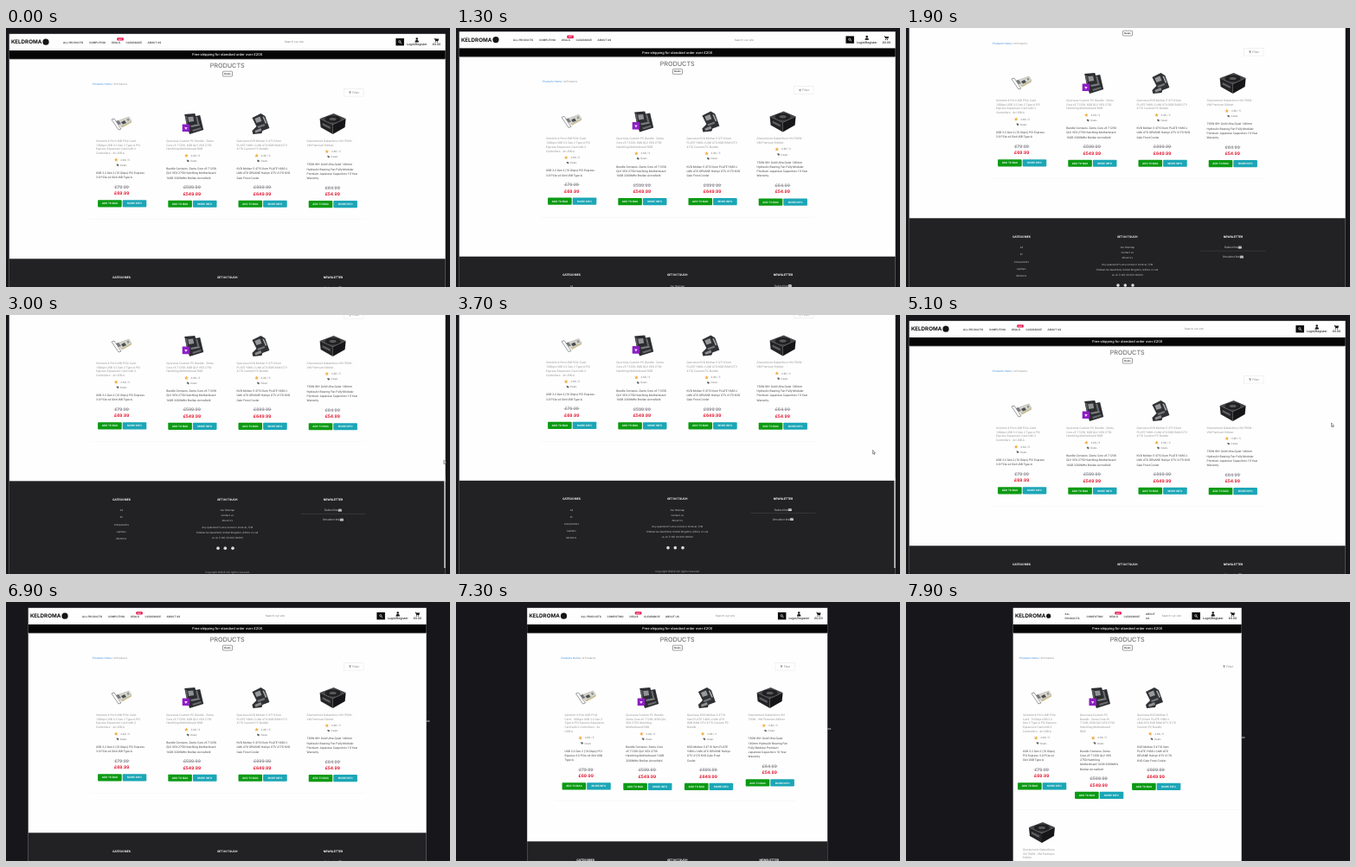
These frames come from a looping animation (513x300 px, 8000 ms). An HTML page:

```html
<!DOCTYPE html>
<html lang="en">
<head>
<meta charset="utf-8">
<title>Shop page</title>
<style>
html, body { margin: 0; width: 100%; height: 100%; overflow: hidden; background: #17171b; }
svg { display: block; width: 100vw; height: 100vh; text-rendering: geometricPrecision; }
text { font-family: Inter, Roboto, sans-serif; white-space: pre; }
.copy text { font-family: Roboto, "Open Sans", sans-serif; }
</style>
</head>
<body>
<svg id="stage" viewBox="0 0 513 300"></svg>
<script>
const stage = document.getElementById('stage');
const LOOP = 8000, STEP = 100, MID = 255.7;

const products = [
  { title: 'Velotrim 4-Port USB PCIe Card - 10Gbps USB 3.2 Gen 2 Type-A PCI Express Expansion Card with 2 Controllers - 4x USB-A',
    info: 'USB 3.2 Gen 2 (10 Gbps) PCI Express 3.0 PCIe x4 Slot USB Type-A',
    was: '£79.99', now: '£69.99', art: expansionCard },
  { title: 'Quorvexa Custom PC Bundle - Zentu Core z5 7125K, 8GB QLV VEX 2750 Hatchling Motherboard RGB',
    info: 'Bundle Contains: Zentu Core z5 7125K QLV VEX 2750 Hatchling Motherboard 16GB 3200MHz Brellan Arrowfield',
    was: '£599.99', now: '£549.99', art: purpleBoard },
  { title: 'Quorvexa KVD Moltan 5 4710 Ilum PLATE Y480-J LM6 ATX 8GB RAM GTV 4170 Custom PC Bundle',
    info: 'KVD Moltan 5 4710 Ilum PLATE Y480-J LM6 ATX ORVANE Halcyn GTV 4170 KVD Gale Frost Cooler',
    was: '£699.99', now: '£649.99', art: darkBoard },
  { title: 'Glaciermont Oakenforce VN 750W - VM Premium Edition',
    info: '750W 80+ Gold Ultra Quiet 140mm Hydraulic Bearing Fan Fully Modular Premium Japanese Capacitors 10 Year Warranty',
    was: '£64.99', now: '£54.99', art: powerSupply }
];

// Responsive layouts, widest first
const layouts = [
  { min: 367.5, x: 134, gap: 81.2, inset: 30, cols: 4, titleLen: 33, infoLen: 36,
    crumb: 100, filter: 396, line: [97, 415, 221.5], footer: 267.3, footGap: 122.3 },
  { min: 315, x: 150.5, gap: 70.7, inset: 25, cols: 4, titleLen: 28, infoLen: 28,
    crumb: 121.5, filter: 374.5, line: [114, 393, 230.5], footer: 277.3, footGap: 106 },
  { min: 0, x: 157, gap: 66, inset: 22, cols: 3, titleLen: 24, infoLen: 25,
    crumb: 131, filter: 366, line: [127, 386, 240], footer: 420, footGap: 84 }
];

// Time keys: [ms, value]
const scrollKeys = [[1200, 0], [1900, 47], [2300, 47], [3200, 79], [3600, 79], [4100, 45], [4300, 45], [5100, 0]];
const halfKeys = [[6700, 252], [6900, 230], [7300, 173.5], [7600, 159], [7900, 132]];
const pointerX = [[2900, 514], [3300, 481.5], [3700, 481.5], [5100, 491.5], [5300, 491.5], [5500, 504]];
const pointerY = [[2900, 172], [3300, 156.5], [3700, 156.5], [5100, 125]];
const gripY = [[6000, 135.5], [6900, 138], [7300, 147], [7900, 157]];

const linear = p => p;
const smooth = p => p * p * (3 - 2 * p);

function track(keys, t, ease = linear) {
  if (t <= keys[0][0]) return keys[0][1];
  for (let i = 1; i < keys.length; i++) {
    const [t0, a] = keys[i - 1], [t1, b] = keys[i];
    if (t <= t1) return a + (b - a) * ease((t - t0) / (t1 - t0));
  }
  return keys[keys.length - 1][1];
}

function wrap(text, max) {
  const lines = [''];
  for (const word of text.split(' ')) {
    const last = lines[lines.length - 1];
    const next = last ? last + ' ' + word : word;
    if (next.length <= max) lines[lines.length - 1] = next;
    else lines.push(word);
  }
  return lines;
}

// Drawing helpers; text y is the middle of the capitals
const text = (x, y, s, size, fill = '#222', weight = 400, anchor = 'start') =>
  `<text x="${x}" y="${y + size * 0.36}" font-size="${size}" fill="${fill}" font-weight="${weight}" text-anchor="${anchor}">${s}</text>`;
const mid = (x, y, s, size, fill, weight) => text(x, y, s, size, fill, weight, 'middle');
const rect = (x, y, w, h, fill, extra = '') => `<rect x="${x}" y="${y}" width="${w}" height="${h}" fill="${fill}" ${extra}/>`;
const dot = (x, y, r, fill) => `<circle cx="${x}" cy="${y}" r="${r}" fill="${fill}"/>`;
const path = (d, fill, extra = '') => `<path d="${d}" fill="${fill}" ${extra}/>`;
const at = (x, y, s) => `<g transform="translate(${x} ${y})">${s}</g>`;

function expansionCard() {
  return path('M-6 -2L8 -7L11 -2L-1 4Z', '#d6d4cc', 'stroke="#a5a39a" stroke-width=".5"') +
    path('M-12 -4L-9 -5L-1 7L-4 8Z', 'none', 'stroke="#85868a" stroke-width=".8"') +
    path('M-1 4L11 -2V-.6L0 5.4Z', '#c9bd8e') + path('M-1 -1L3 -3L5 0L1 1.6Z', '#4b4e50') +
    path('M-7 -2L-4 -3L-1 1L-4 2Z', '#77797b') + path('M5.5 -4.5L7.5 -5.2L8.6 -3L6.6 -2.2Z', '#8a8a88');
}

function purpleBoard() {
  return path('M-9 -10L3 -11L4 -8L9 -9L13 8L-3 13L-5 8Z', '#2c2d30') + path('M-5 -7L1 -7.5L2 -2L-4 -1Z', '#909294') +
    path('M4 -7L6 -7L8 1L6 1Z', '#6c6e72') + path('M-2 3L8 1L9 3L-1 5Z', '#7b7d80') +
    path('M0 8L10 5L10.5 7L1 10Z', '#67696c') + path('M-8 -8L-6 -8L-5 1L-7 1Z', '#5a5c60') +
    rect(-11.5, 1.5, 8.6, 8.6, '#8d1fc4', 'rx=".6"') + path('M-9 5H-5.5L-7.3 8Z', '#f1d9fa');
}

function darkBoard() {
  return at(-3, 0, path('M-9 -6L1 -11L6 -8L11 6L3 9L2 12L-8 13L-9 9L-4 4Z', '#303134') +
    path('M-6 -5L0 -7.5L2 -2L-4 0Z', '#97999b') + path('M3 -7L4.5 -7.5L8 0L6.5 1Z', '#a3a5a7') +
    path('M-3 4L5 1L6 3L-2 6Z', '#74767a') + path('M-6 9L1 6L2 9L-5 11.5Z', '#8d8f92'));
}

function powerSupply() {
  return path('M-15 -5L1 -11L15 -5L0 2Z', '#454548') + path('M-15 -5L0 2V13L-14 5Z', '#242426') +
    path('M15 -5L0 2V13L14 5Z', '#161618') + `<ellipse cx="0" cy="-4.6" rx="9" ry="4" fill="#202022"/>` +
    `<ellipse cx="0" cy="-4.6" rx="4" ry="1.7" fill="#58585b"/>` + path('M-12 0L-3 4.5V7L-12 2.5Z', '#606064');
}

function button(x, y, label, fill) {
  return rect(x, y - 4.1, 27.6, 8.2, fill, 'rx=".8"') + mid(x + 13.8, y, label, 3, '#fff', 600);
}

function card(item, cx, top, lay) {
  const left = cx - lay.inset;
  let out = at(cx, top + 110, item.art()), y = top + 130.6, copy = '';
  for (const line of wrap(item.title, lay.titleLen)) {
    copy += text(left, y, line, 3.4, '#969696');
    y += 4.8;
  }
  y += 2.7;
  out += path('M0 -2.2L.7 -.7L2.2 -.5L1.1 .6L1.4 2.1L0 1.4L-1.4 2.1L-1.1 .6L-2.2 -.5L-.7 -.7Z', '#f3b04a',
    `transform="translate(${cx - 6.8} ${y})"`) + text(cx - 1.8, y, '4.88 / 5', 3, '#888');
  y += 6.2;
  out += path('M-1.5 -1.2H.1L1.5 .2L.1 1.5L-1.5 0Z', '#666', `transform="translate(${cx - 4.8} ${y})"`) +
    text(cx - 2, y, 'Deals', 2.9, '#777');
  y += 9;
  for (const line of wrap(item.info, lay.infoLen)) {
    copy += text(left, y, line, 3.4, '#484848');
    y += 5.25;
  }
  y += 5.8;
  const half = item.was.length * 1.55;
  out += mid(cx - 0.3, y, item.was, 4.9, '#8b8b92', 600) + rect(cx - 0.3 - half, y - 0.2, half * 2, 0.4, '#8b8b92') +
    mid(cx - 0.3, y + 7.4, item.now, 4.9, '#e3122b', 700);
  y += 19.3;
  return out + `<g class="copy">${copy}</g>` +
    button(cx - 27.9, y, 'ADD TO BAG', '#0b9a13') + button(cx + 0.7, y, 'MORE INFO', '#1ba6b6');
}

function nav(x, s) {
  return s.split('|').map((line, i, all) =>
    text(x, 16.5 + (i - (all.length - 1) / 2) * 5.2, line, 3.05, '#222', 500)).join('');
}

function header(L, R, lay) {
  const small = lay.cols === 3;
  const xs = small ? [59.5, 84.5, 111, 127.5, 153] : [62, 92, 118, 134.5, 159.5];
  const names = small ? ['ALL|PRODUCTS', 'COMPUTING', 'DEALS', 'CLEARANCE', 'ABOUT|US']
    : ['ALL PRODUCTS', 'COMPUTING', 'DEALS', 'CLEARANCE', 'ABOUT US'];
  const find = lay === layouts[0] ? R - 186 : small ? R - 92 : 300;
  const user = R - 33, cart = R - 10.3;
  return text(L + 2.2, 16.2, 'KELDROMA', 6.2, '#111', 700) + dot(L + (small ? 41 : 42.3), 16.2, small ? 2.6 : 3.6, '#151515') +
    names.map((s, i) => nav(L + xs[i] + 0.3, s)).join('') +
    rect(L + xs[2] + 6.6, 11.2, 7.6, 3.4, '#e5174f', 'rx="1"') + mid(L + xs[2] + 10.4, 12.9, 'HOT', 2.2, '#fff', 700) +
    text(find, 16.2, 'Search our site', 3.1, '#808080') +
    rect(R - 57.3, 12, 9.5, 8.4, '#080808') +
    `<circle cx="${R - 52.9}" cy="15.8" r="1.2" fill="none" stroke="#fff" stroke-width=".6"/>` +
    path(`M${R - 52} 16.7l1.3 1.3`, 'none', 'stroke="#fff" stroke-width=".7"') +
    dot(user, 12.6, 1.25, '#111') + path(`M${user - 2.3} 16.4q0 -2.4 2.3 -2.4t2.3 2.4Z`, '#111') +
    mid(user, 19.2, 'Login/Register', 3.4, '#111', 500) +
    path(`M${cart - 2.7} 11.8h1l.4 .8h4l-.8 2.3h-3Z`, '#111') + dot(cart - 0.9, 15.9, 0.6, '#111') + dot(cart + 1.2, 15.9, 0.6, '#111') +
    mid(cart, 19.2, '£0.00', 3.4, '#111', 500);
}

function envelope(x, y) {
  return rect(x, y - 1.4, 4, 2.8, '#ddd') + path(`M${x} ${y - 1.2}l2 1.4l2 -1.4`, 'none', 'stroke="#222" stroke-width=".4"');
}

function footer(L, R, lay) {
  const y = lay.footer, a = MID - lay.footGap, b = MID + lay.footGap;
  const heads = ['CATEGORIES', 'GET IN TOUCH', 'NEWSLETTER'];
  const soft = (x, dy, s, size = 2.85) => mid(x, y + dy, s, size, '#cfcfcf');
  return rect(L, y, R - L, 300, '#222123') +
    [a, MID, b].map((x, i) => mid(x, y + 21.3, heads[i], 3.3, '#fff', 700)).join('') +
    ['All', 'Pc', 'Components', 'Laptops', 'Monitors'].map((s, i) => soft(a, 33.8 + i * 8.2, s)).join('') +
    ['Our Sitemap', 'Contact us', 'About Us'].map((s, i) => soft(MID, 33.8 + i * 6, s)).join('') +
    ['Any questions? Let us know in store at, 7/16', 'Elmbarrow Quenfield, United Kingdom, QZ0xx or call', 'us on (+00) 00 000 00000']
      .map((s, i) => soft(MID, 53.5 + i * 6, s)).join('') +
    [245, 253.3, 262].map(x => dot(x, y + 77.8, 1.8, '#ddd')).join('') +
    soft(b - 2.5, 33.8, 'Subscribe', 3.3) + envelope(b + 5.8, y + 33.8) +
    rect(b - 37.5, y + 37.6, 75, 0.4, '#555') +
    soft(b - 2.5, 44.8, 'Unsubscribe', 3.3) + envelope(b + 7.8, y + 44.8) +
    mid(MID, y + 105.3, 'Copyright ©2021 All rights reserved', 3, '#aaa');
}

function page(half) {
  const L = MID - half, R = MID + half;
  const lay = layouts.find(l => half * 2 >= l.min);
  const [x0, x1, y0] = lay.line;
  const f = lay.filter;
  return rect(L, 6.8, R - L, 600, '#fefefe') + header(L, R, lay) +
    rect(L, 35, R - L, 1.8, '#bbb') + rect(L, 26, R - L, 9.8, '#050505') +
    mid(MID, 30.8, 'Free shipping for standard order over £200', 3.95, '#fff', 500) +
    mid(MID, 43.8, 'PRODUCTS', 7.25, '#5c5c5c') +
    rect(250.5, 50.2, 11, 5.8, '#fff', 'rx=".6" stroke="#444" stroke-width=".5"') + mid(256, 53.1, 'Deals', 2.7, '#111', 600) +
    `<text x="${lay.crumb}" y="65.8" font-size="3" fill="#888"><tspan fill="#2b84d8">Products Home</tspan> / # Products</text>` +
    (lay.cols === 4 ? rect(f - 5.5, 70.3, 22.5, 8.8, 'none', 'stroke="#e6e6e6" stroke-width=".5"') : '') +
    path(`M${f} 73.6h3l-1.1 1.3v1.5l-.8 -.5v-1Z`, '#888') + text(f + 4.2, 74.8, 'Filter', 3.3, '#808080') +
    rect(x0, y0, x1 - x0, 0.5, '#f2f2f2') +
    products.map((p, i) => card(p, lay.x + lay.gap * (i % lay.cols), 156 * Math.floor(i / lay.cols), lay)).join('') +
    footer(L, R, lay);
}

function pointer(t, half) {
  if (t >= 6000) {
    return at(MID + half + 2, track(gripY, t),
      path('M-2.2 0l1.4 -1.3v.9h1.6v-.9l1.4 1.3l-1.4 1.3v-.9h-1.6v.9Z', '#9a9a9d'));
  }
  if (t < 3000 || t > 5500) return '';
  return at(track(pointerX, t), track(pointerY, t),
    path('M0 0V4.4L1 3.5L1.7 5L2.4 4.7L1.7 3.2H3Z', '#fff', 'stroke="#222" stroke-width=".45"'));
}

// The thumb shows only near the end of the page
const thumb = scroll => scroll > 60 ? rect(506.3, 2.5 * scroll, 1.3, 293 - 2.5 * scroll, '#e4e4e4') : '';

function render(t) {
  const half = track(halfKeys, t), scroll = track(scrollKeys, t, smooth);
  stage.innerHTML = rect(0, 0, 513, 300, '#17171b') +
    at(0, -scroll, page(half)) + thumb(scroll) + pointer(t, half);
}

const start = performance.now();
let shown = -1;
function tick() {
  const t = Math.floor((performance.now() - start) % LOOP / STEP) * STEP;
  if (t !== shown) render(shown = t);
  requestAnimationFrame(tick);
}
tick();
</script>
</body>
</html>
```
